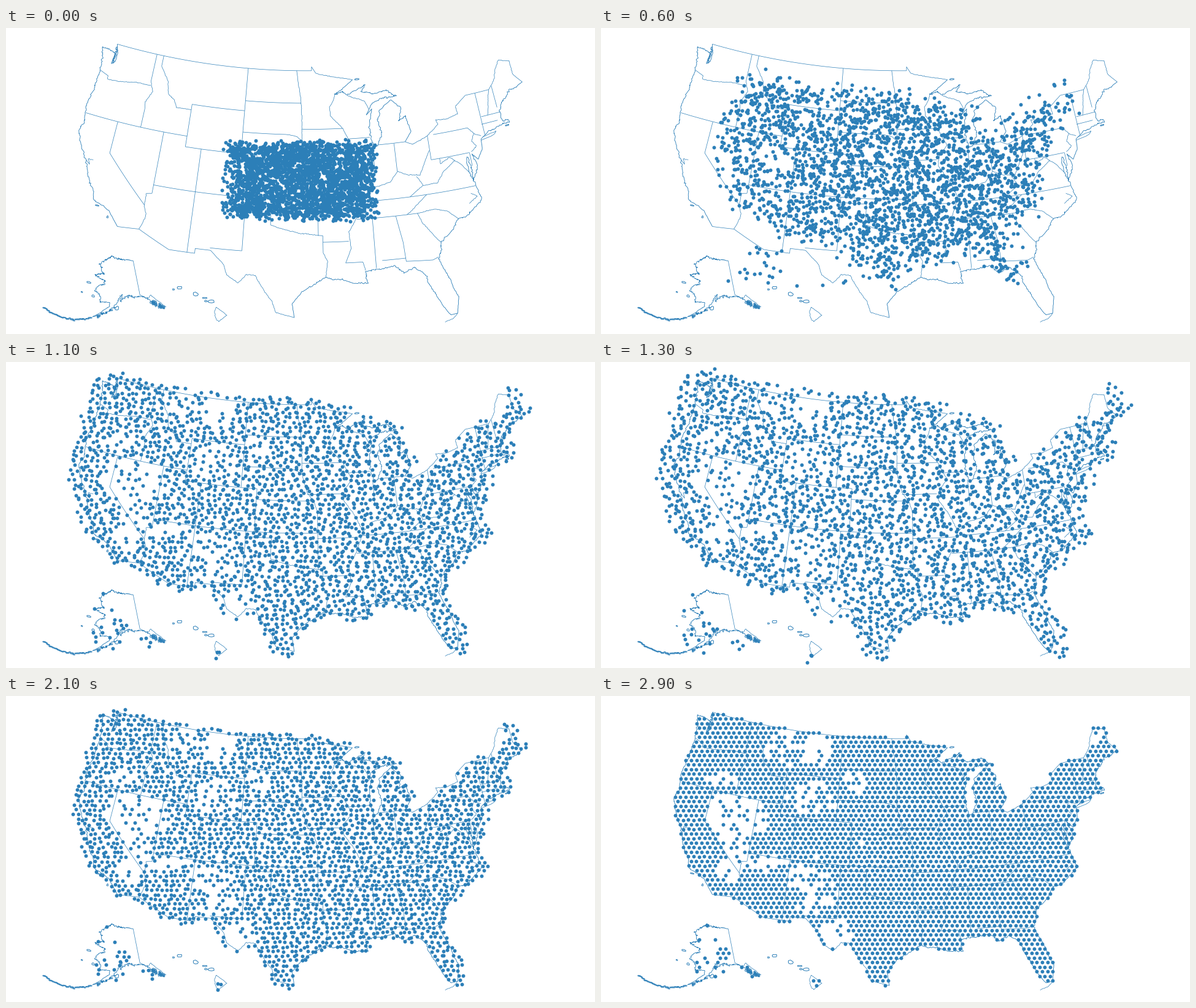
These frames come from a looping animation (960 by 500 pixels, 7.9 s). A matplotlib script:

```python
import numpy as np
import matplotlib.pyplot as plt
from matplotlib.animation import FuncAnimation
from matplotlib.collections import LineCollection
from matplotlib.path import Path

W, H, DPI = 960, 500, 100
BLUE = "#2c7fb8"
rng = np.random.default_rng(12)


def albers(meridian, p1, p2, center, scale, at):
    """Conic equal-area projection of west longitude and latitude to pixels."""
    s1, s2 = np.sin(np.radians([p1, p2]))
    n = (s1 + s2) / 2
    c = 1 + s1 * (2 * n - s1)

    def raw(west, lat):
        r = np.sqrt(c - 2 * n * np.sin(np.radians(lat))) / n
        a = n * np.radians(meridian - west)
        return np.array([r * np.sin(a), r * np.cos(a)])

    mid = raw(*center)

    def project(pts):
        return (raw(pts[:, 0], pts[:, 1]).T - mid) * scale + at
    project.step = 100 / scale
    return project


usa = albers(96, 29.5, 45.5, (96.6, 38.7), 1000, (480, 250))
alaska = albers(154, 55, 65, (156, 58.5), 350, (173, 451))
hawaii = albers(157, 8, 18, (160, 19.9), 1000, (275, 462))

lines, widths, outline = [], [], []


def wiggle(count, rough):
    """Fine and broad noise that fades out at both ends."""
    noise = rng.normal(0, 1, (count + 8, 2))
    broad = sum(noise[k:k + count] for k in range(9)) / 3
    fade = np.minimum(1, 2 * np.sin(np.linspace(0, np.pi, count)))
    return rough * fade[:, None] * (0.7 * noise[:count] + 0.8 * broad)


def trace(*nums, rough=0.0, proj=usa):
    """Draw a line through (west, lat) pairs and return its smooth pixels."""
    pts = np.array(nums, float).reshape(-1, 2)
    step = proj.step if rough else 0.5
    parts = [pts[:1]]
    for a, b in zip(pts, pts[1:]):
        k = max(1, int(np.ceil(np.abs(b - a).max() / step)))
        parts.append(a + (b - a) * np.arange(1, k + 1)[:, None] / k)
    smooth = proj(np.concatenate(parts))
    lines.append(smooth + wiggle(len(smooth), rough))
    widths.append(0.62 if rough > 0.5 else 0.5)
    return smooth


pen = (122.8, 49)


def edge(*nums, rough=0.75):
    """Continue the national outline from where it stopped."""
    global pen
    outline.append(trace(*pen, *nums, rough=rough))
    pen = nums[-2:]


def river(*nums):
    trace(*nums, rough=0.35)


def islet(west, lat, dw, dl, proj=usa):
    a = np.linspace(0, 2 * np.pi, 9)
    r = rng.uniform(0.65, 1.2, 9)
    r[-1] = r[0]
    ring = np.column_stack([west + dw * r * np.cos(a), lat + dl * r * np.sin(a)])
    trace(*ring.ravel(), proj=proj)
    widths[-1] = 0.7


# Pacific, Mexico, Gulf, Atlantic, Canada and the lakes
edge(122.4, 48.2, 122.4, 47.4, 122.9, 47.1, 122.7, 48.1, 124.7, 48.4, 124.1, 46.9,
     124, 46.2, 124.1, 44.3, 124.5, 42.8, 124.1, 41.2, 124.4, 40.4, 123.7, 39,
     122.5, 37.8, 121.9, 36.6, 120.65, 35.1, 120.5, 34.5, 119.2, 34.1, 118.4, 33.75,
     117.12, 32.53)
edge(114.72, 32.72, 111.07, 31.33, 108.2, 31.33, 108.2, 31.78, 106.5, 31.78, rough=0)
edge(104.9, 30.6, 104.5, 29.65, 103.15, 28.97, 102.4, 29.85, 101.4, 29.77, 100.3, 28.3,
     99.5, 27.5, 99.1, 26.4, 97.15, 25.95, rough=0.4)
edge(97.4, 27.2, 96.4, 28.35, 94.75, 29.35, 93.8, 29.7, 92.3, 29.55, 90.9, 29.1,
     89.4, 29, 89.5, 30.2, 88.1, 30.25, 86.4, 30.38, 85.3, 29.7, 84.2, 30.1, 83.1, 29.2,
     82.7, 27.9, 81.8, 26.2, 81.1, 25.15, 80.4, 25.2)
edge(80.03, 26.7, 80.6, 28.4, 81.4, 30.5, 80.9, 32, 79.3, 33.1, 78.5, 33.85, 77.9, 33.9,
     76.5, 34.6, 75.5, 35.2, 76, 36.9, 76.4, 39, 76.1, 39.4, 75.95, 37.15, 75.1, 38.4,
     75.5, 39.5, 74.9, 38.95, 74.1, 39.8, 74, 40.7)
edge(72.9, 41.25, 71.4, 41.5, 70, 41.6, 70.2, 42.05, 70.6, 41.85, 70.8, 42.8,
     70.2, 43.6, 68.8, 44.4, 66.97, 44.82)
edge(67.8, 45.7, 67.8, 47.07, 69.2, 47.45, 70, 46.7, 70.3, 45.9, 71.5, 45, rough=0.4)
edge(74.7, 45, rough=0)
edge(76.3, 44.2, 76.2, 43.5, 77.6, 43.25, 79.07, 43.26, 78.9, 42.9, 80.5, 41.98,
     82.5, 41.4, 83.4, 41.73, rough=0.4)
edge(82.5, 42.6, 82.9, 44.07, 83.9, 43.65, 83.3, 45, 84.75, 45.77, 86.1, 44.9, 86.5, 44,
     86.2, 42.6, 86.8, 41.76, 87.4, 41.62, 87.8, 42.3, 87.7, 43.8, 87.2, 45.1, 88, 44.6)
edge(87.1, 45.7, 85.5, 46.05, 83.8, 46, 85, 46.7, 87, 46.5, 88.3, 46.85, 87.9, 47.45,
     90.4, 46.57, 90.9, 46.9, 92, 46.7, 89.5, 48)
edge(92, 48.35, 94.6, 48.75, 95.15, 49.38, 95.15, 49, rough=0.4)
edge(122.8, 49, rough=0)

# Borders along parallels: latitude, west end, east end
for lat, a, b in [
    (42, 124.2, 111.05), (45, 111.05, 104.05), (41, 111.05, 102.05),
    (45.94, 104.05, 96.56), (43, 104.05, 98.5), (37, 114.05, 94.6), (36.5, 103, 100),
    (40, 102.05, 95.3), (43.5, 96.45, 91.2), (40.6, 95.8, 91.5), (42.5, 90.6, 87.8),
    (36.5, 94.6, 89.6), (33, 94.04, 91.15), (31, 91.6, 89.7), (35, 90.1, 83.1),
    (36.6, 89.5, 75.9), (31, 87.6, 85), (39.72, 80.52, 75.8), (42, 79.76, 75.35),
    (42.03, 73.5, 71.4), (42.72, 73.3, 70.8), (41.73, 86.8, 83.4), (32, 106.6, 103.06),
]:
    trace(a, lat, b, lat)

# Borders along meridians: longitude, north end, south end
for west, a, b in [
    (117.03, 49, 46.4), (117.03, 43.8, 42), (116.05, 49, 48), (114.04, 42, 36.2),
    (111.05, 45, 41), (109.05, 41, 31.33), (104.05, 49, 41), (103.04, 37, 32),
    (102.05, 41, 37), (100, 36.5, 34.56), (94.55, 39.1, 33.6), (94.04, 33.6, 32),
    (88.3, 35, 30.35), (87.53, 41.7, 39.3), (84.82, 41.7, 39.1), (80.52, 42, 39.72),
    (75.75, 39.72, 38.46), (73.4, 45, 41), (71.05, 45.3, 43.2),
]:
    trace(west, a, west, b)

trace(120, 42, 120, 39, 114.63, 35)
trace(85.6, 35, 85.1, 32.5, 85, 30.7, 82.1, 30.5, 81.45, 30.7)

# Borders along rivers and ridges
river(124, 46.2, 122.8, 45.9, 122.7, 45.6, 121.2, 45.65, 119, 46, 116.92, 46)
river(117.03, 46.4, 116.5, 45.5, 117.2, 44.4, 117.03, 43.8)
river(116.05, 48, 114.7, 46.7, 114.4, 45.6, 113.5, 45.1, 113, 44.45, 111.05, 44.5)
river(114.05, 36.2, 114.7, 36.1, 114.6, 35, 114.2, 34.2, 114.72, 32.72)
river(98.5, 43, 97.2, 42.85, 96.4, 42.4, 95.85, 40.8, 94.9, 39.8, 94.6, 39.1)
river(100, 34.56, 98.1, 34.1, 96.6, 33.85, 94.04, 33.6)
river(94.04, 32, 93.55, 31.2, 93.8, 29.7)
river(97.23, 49, 96.6, 46, 96.45, 45.3, 96.45, 42.5)
river(92, 46.7, 92.3, 46.1, 92.8, 45.5, 92.7, 44.7, 91.2, 43.5, 90.15, 41.9, 91.1, 41,
      91.4, 40, 90.2, 38.7, 89.2, 37, 90.1, 35.1, 91.1, 33.9, 90.9, 32.3, 91.6, 31)
river(89.73, 31, 89.5, 30.2)
river(90.4, 46.57, 88.1, 45.9, 87.6, 45.1)
river(83.1, 35, 82.6, 34, 80.9, 32)
river(83.1, 35, 81.05, 35.15, 79.7, 34.8, 78.5, 33.85)
river(84.3, 35, 82.6, 36, 81.7, 36.6)
river(83.68, 36.6, 82, 37.5, 80.3, 37.5, 79.3, 38.4, 77.7, 39.3)
river(82, 37.5, 82.6, 38.4)
river(89.15, 37, 88, 37.8, 85.8, 38.2, 84.8, 39.1, 83.7, 38.65, 82.2, 38.5, 80.6, 40.6)
river(75.35, 42, 74.7, 41.36, 75.2, 40.7, 74.75, 40.2, 75.5, 39.75)
river(74.7, 41.36, 73.9, 41)
river(79.48, 39.72, 79.48, 39.2, 78.2, 39.65, 77.1, 38.9, 76.3, 37.95)
river(72.45, 42.73, 71.5, 45)

# Bays and islands
river(122.5, 37.8, 122, 37.5, 122.3, 38, 121.7, 38)
river(74, 40.6, 72.4, 40.8, 71.9, 41.07, 73.7, 40.87)
river(77, 35.1, 75.9, 35.6, 76.6, 36)
river(80.4, 25.2, 80.9, 24.75, 81.8, 24.55)
islet(88.9, 48.02, .3, .07)
islet(119.9, 34, .25, .05)
islet(118.45, 33.2, .1, .1)
islet(70.4, 41.35, .25, .05)
for lat in np.linspace(47.3, 48.6, 7):
    islet(122.65 + rng.normal(0, .12), lat, .1, .13)

# Alaska
trace(141, 69.65, 149, 70.5, 156.6, 71.35, 162, 70.25, 166.2, 68.6, 161.8, 66.5,
      168.1, 65.65, 161.2, 64.5, 161, 63.7, 164.7, 63, 166, 61.7, 162, 60, 161.9, 58.7,
      157.2, 58.8, 157.6, 57.6, 164.9, 54.6, rough=0.9, proj=alaska)
trace(164.9, 54.6, 158.5, 56.1, 154, 58.5, 150.5, 61.2, 151.6, 59.3, 147.9, 60.6,
      144, 60, 139.5, 59.6, 135.5, 57.5, 131, 55, rough=0.9, proj=alaska)
trace(130, 55.3, 132, 57, 135.4, 59.7, 137.5, 58.95, 141, 60.3,
      rough=0.35, proj=alaska)
trace(141, 60.3, 141, 69.65, proj=alaska)
for t in rng.random(34):
    islet(136.3 - 5.2 * t + rng.normal(0, .5), 58.3 - 3.2 * t + rng.normal(0, .25),
          .45, .28, alaska)
for t in np.linspace(0, 1, 34):
    islet(165.5 + 21.5 * t, 54.2 - 5.6 * t + 4.2 * t * t + rng.normal(0, .12),
          .5, .13, alaska)
for t in rng.random(16):
    islet(154 + 9 * t, 57.6 - 2.8 * t + rng.normal(0, .25), .35, .18, alaska)
islet(153.5, 57.4, 1, .5, alaska)
islet(147.5, 60.3, .4, .3, alaska)
islet(166.3, 60.1, .8, .3, alaska)
islet(170.3, 63.4, 1.3, .25, alaska)
islet(172.8, 60.4, .5, .15, alaska)

# Hawaii
trace(155.9, 20.25, 154.8, 19.5, 155.65, 18.93, 155.9, 19.1, 156.05, 19.75, 155.9, 20.25,
      rough=0.4, proj=hawaii)
islet(156.35, 20.8, .35, .15, hawaii)
islet(157, 21.12, .28, .06, hawaii)
islet(156.92, 20.83, .12, .08, hawaii)
islet(157.95, 21.48, .28, .18, hawaii)
islet(159.53, 22.07, .23, .14, hawaii)
islet(160.15, 21.9, .1, .08, hawaii)

# Hexagonal grid of dots over the land
ROW, COL = 7.5, 5 * np.sqrt(3)
row, col = np.mgrid[3:65, 12:100]
grid = np.column_stack([((col + row % 2 / 2) * COL).ravel(), (row * ROW).ravel()])


def oval(cx, cy, rx, ry):
    return (((grid - (cx, cy)) / (rx, ry)) ** 2).sum(axis=1) < 1


def thin(share, *ovals):
    """Keep only a share of the dots in each oval."""
    global keep
    for o in ovals:
        keep &= ~oval(*o) | (rng.random(len(grid)) < share)


land = Path(np.concatenate(outline))
near = [(0, 0), (2.2, 0), (-2.2, 0), (0, 2.2), (0, -2.2)]
keep = np.any([land.contains_points(grid + d) for d in near], axis=0)

thin(.25, (352, 88, 24, 26), (196, 136, 33, 12), (415, 142, 18, 20), (257, 200, 13, 22),
     (272, 274, 33, 13), (208, 285, 18, 21), (384, 386, 27, 22), (805, 66, 13, 14))
thin(.6, (310, 85, 45, 28), (345, 165, 44, 30), (345, 310, 42, 48), (422, 243, 14, 9))
basin = Path([(181, 152), (256, 170), (240, 258), (228, 288), (170, 206)])
keep &= ~basin.contains_points(grid) | (rng.random(len(grid)) < .24)

# Alaska and Hawaii
keep |= oval(199, 421, 13, 14) | oval(350, 467, 6, 8)
keep |= oval(177, 446, 24, 16) & (rng.random(len(grid)) < .4)
for spot in [(173, 375), (159, 398), (186, 398), (168, 428), (155, 435),
             (229, 443), (238, 443), (246, 450), (251, 458)]:
    keep[np.hypot(*(grid - spot).T).argmin()] = True

home = grid[keep]
start = rng.uniform((W * 3 / 8, H * 3 / 8), (W * 5 / 8, H * 5 / 8), home.shape)

# Share of the way home every three frames: overshoot, then settle
KEYS = np.array([.045, .405, .768, .98, 1.062, 1.069, 1.05, 1.028, 1.013, 1.004, 1])
SLOPES = np.gradient(KEYS)
LAST = 29


def ease(frame):
    i, u = divmod(min(frame, LAST) / 3, 1)
    i = int(i)
    a, b = KEYS[i:i + 2]
    m, n = SLOPES[i:i + 2]
    c = 3 * (b - a) - 2 * m - n
    d = 2 * (a - b) + m + n
    return a + u * (m + u * (c + u * d))


fig = plt.figure(figsize=(W / DPI, H / DPI), dpi=DPI, facecolor="white")
ax = fig.add_axes([0, 0, 1, 1])
ax.set_xlim(0, W)
ax.set_ylim(H, 0)
ax.axis("off")
ax.add_collection(LineCollection(lines, colors=BLUE, linewidths=widths))
dots = ax.scatter(*start.T, s=(5.9 * 72 / DPI) ** 2, color=BLUE, linewidths=0, zorder=3)


def draw(frame):
    dots.set_offsets(start + ease(frame) * (home - start))
    return dots,


anim = FuncAnimation(fig, draw, frames=79, interval=100, repeat=True,
                     init_func=lambda: draw(0))
plt.show()
```
